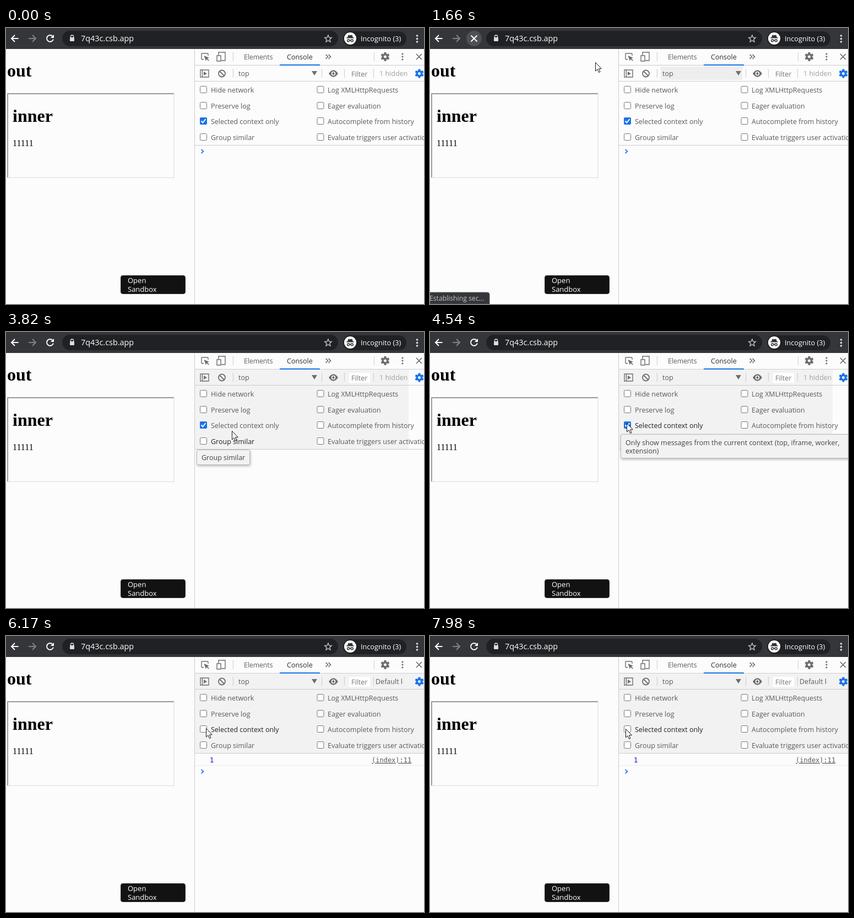
An HTML page that plays this animation: 759 by 500 pixels, repeating every 8 s.

```html
<!DOCTYPE html>
<html lang="en">
<head>
<meta charset="utf-8">
<title>Console context filter</title>
<style>
html, body { margin: 0; width: 100%; height: 100%; overflow: hidden; background: #fcfcfc; }
svg { display: block; }
text { font: 12.5px "Open Sans", "Noto Sans", sans-serif; fill: #5a5a5a; white-space: pre; }
.serif { font: 16px "Liberation Serif", serif; fill: #000; }
.head { font-size: 32px; font-weight: bold; }
.mono { font: 12px "DejaVu Sans Mono", monospace; }
.line { fill: none; stroke-width: 1.4; stroke: #6e6e6e; }
.white { stroke: #fff; stroke-width: 2; }
.light { fill: #fff; }
.rule { fill: none; stroke: #ccc; }
.tip rect { fill: #f2f2f2; stroke: #b8b8b8; filter: drop-shadow(1px 2px 2px #0004); }
</style>
</head>
<body>
<svg id="stage" width="759" height="500" viewBox="0 0 759 500">
  <rect width="759" height="500" fill="#fcfcfc"/>

  <!-- page -->
  <text class="serif head" x="2" y="88">out</text>
  <path d="M2 118H306L304 120H4V270L2 272Z" fill="#999"/>
  <path d="M306 118V272H2L4 270H304V120Z" fill="#eaeaea"/>
  <g id="inner">
    <text class="serif head" x="12" y="170">inner</text>
    <text class="serif" x="12" y="214">11111</text>
  </g>
  <rect x="208.5" y="448.5" width="117" height="33" rx="3.5" fill="#121212" stroke="#333"/>
  <text class="light" x="221" y="462" style="font-size:13px">Open</text>
  <text class="light" x="221" y="478" style="font-size:13px">Sandbox</text>
  <g id="status">
    <path d="M0 479H104Q108 479 108 483V500H0Z" fill="#35363a" stroke="#55565a"/>
    <text x="-1" y="494" style="font-size:12.2px;fill:#c4c6c9">Establishing sec...</text>
  </g>

  <!-- browser bar -->
  <rect width="759" height="38" fill="#35363a"/>
  <path class="line white" d="M22.500 19H10M16 13L10 19L16 25"/>
  <path class="line white" d="M41 19H54M48 13L54 19L48 25" style="stroke:#808286"/>
  <circle id="halo" cx="80" cy="19" r="14" fill="#4e5054"/>
  <g id="reload">
    <path class="line white" d="M84.600 15A6 6 0 1 0 85.800 20.500"/>
    <path class="light" d="M87 12V18H81Z"/>
  </g>
  <path id="stop" class="line white" d="M74.500 13.500L85.500 24.500M85.500 13.500L74.500 24.500"/>
  <rect x="102" y="5" width="501" height="28" rx="14" fill="#202124"/>
  <rect x="116" y="17" width="8" height="7" rx="1" fill="#dadce0"/>
  <path class="line" d="M117.500 17V15.500A2.500 2.500 0 0 1 122.500 15.500V17" style="stroke:#dadce0"/>
  <text class="light" x="136" y="24" style="font-size:14.4px">7q43c.csb.app</text>
  <path class="line" d="M585 13L586.800 17.200L591.300 17.600L587.900 20.600L588.900 25L585 22.700L581.100 25L582.100 20.600L578.700 17.600L583.200 17.200Z" style="stroke:#c4c6c9"/>
  <rect x="612" y="6" width="115" height="27" rx="13.500" fill="#202124"/>
  <circle cx="625" cy="19" r="11" class="light"/>
  <path d="M618 18.500H632V17.300H630L628.500 12.500L625 13.300L621.500 12.500L620 17.300H618Z" fill="#333"/>
  <path class="line" d="M624 22.500Q625 21.500 626 22.500" style="stroke:#333"/>
  <g fill="none" stroke="#333" stroke-width="1.500"><circle cx="621.700" cy="22.700" r="2"/><circle cx="628.300" cy="22.700" r="2"/></g>
  <text class="light" x="644" y="24" style="font-size:12.7px">Incognito (3)</text>
  <g fill="#e8eaed"><circle cx="746.500" cy="14" r="1.700"/><circle cx="746.500" cy="19.500" r="1.700"/><circle cx="746.500" cy="25" r="1.700"/></g>

  <!-- developer tools -->
  <rect id="panel" x="343" y="68" height="144" fill="#f2f2f2"/>
  <rect id="topHover" x="419" y="70" width="148" height="24" fill="#eee"/>
  <path class="rule" d="M342.500 38V500M343 67.500H759M343 96.500H759M343 212.500H759M412.500 44V60M668.500 44V60M412.500 74V90M573.500 74V90M614.500 74V90M667.500 74V90"/>
  <path class="line" d="M359 57H356Q355 57 355 56V47Q355 46 356 46H366Q367 46 367 47V50"/>
  <path d="M359.500 50L369 54L365.500 55.300L368.800 58.600L367.600 59.800L364.300 56.500L362.800 59.500Z" fill="#6e6e6e"/>
  <path class="line" d="M386 49V44H398V59H391M383 50H390V60H383Z"/>
  <text x="432" y="57" style="font-size:12.2px">Elements</text>
  <text x="510" y="57" style="fill:#303030">Console</text>
  <rect x="497" y="66" width="73" height="2" fill="#1a73e8"/>
  <path class="line" d="M580.500 48L584.500 52L580.500 56M585.500 48L589.500 52L585.500 56M745 47L755 57M755 47L745 57" style="stroke-width:1.700"/>
  <g id="gears"></g>
  <g fill="#6e6e6e"><circle cx="720" cy="47" r="1.600"/><circle cx="720" cy="52" r="1.600"/><circle cx="720" cy="57" r="1.600"/></g>
  <path class="line" d="M353 76H368V89H353ZM356.500 76V89"/>
  <path d="M359 79V86L365 82.500ZM555 78H565L560 86Z" fill="#6e6e6e"/>
  <path class="line" d="M386 82.500A6 6 0 1 1 398 82.500A6 6 0 1 1 386 82.500M388 78.500L396 86.500" style="stroke-width:1.800"/>
  <text x="422" y="87">top</text>
  <path d="M586 82.500Q594.500 70 603 82.500Q594.500 95 586 82.500Z" fill="#6e6e6e"/>
  <circle cx="594.500" cy="82.500" r="3" fill="#6e6e6e" stroke="#fff" stroke-width="1.500"/>
  <rect id="filterBox" x="623" y="74" width="38" height="18" fill="#fff"/>
  <text x="627" y="88" style="fill:#757575">Filter</text>
  <text id="hidden" x="678" y="87" style="fill:#a0a0a0">1 hidden</text>
  <svg id="levels" x="671" y="70" width="50" height="25"><text y="17">Default levels</text></svg>
  <g id="options"></g>

  <!-- console output -->
  <g id="message">
    <text class="mono" x="370" y="229" style="fill:#1c00cf">1</text>
    <text class="mono" x="664" y="229" style="text-decoration:underline">(index):11</text>
    <path d="M343 234.500H759" stroke="#ededed"/>
  </g>
  <path id="prompt" class="line" d="M354.500 -3.500L358.500 0L354.500 3.500" style="stroke:#2f7bf0;stroke-width:1.700"/>

  <g id="groupTip" class="tip">
    <rect x="346.500" y="213.500" width="96" height="27" rx="2"/>
    <text x="355" y="232" style="fill:#444">Group similar</text>
  </g>
  <g id="contextTip" class="tip">
    <rect x="346.500" y="185.500" width="430" height="43" rx="2"/>
    <text x="355" y="205" style="fill:#444">Only show messages from the current context (top, iframe, worker,</text>
    <text x="355" y="220" style="fill:#444">extension)</text>
  </g>
  <circle id="ring" cx="365" cy="168" r="10" fill="none" stroke="#111" stroke-width="1.200"/>
  <path id="cursor" d="M.5 .5V16L4 12.700L6.500 18.500L9 17.400L6.500 11.800H11.300Z" fill="#fff" stroke="#111"/>
</svg>
<script>
const $ = id => document.getElementById(id);
const show = (id, on) => $(id).style.display = on ? '' : 'none';

const labels = ['Hide network', 'Preserve log', 'Selected context only', 'Group similar',
  'Log XMLHttpRequests', 'Eager evaluation', 'Autocomplete from history', 'Evaluate triggers user activation'];
$('options').innerHTML = labels.map((label, i) => {
  const x = i < 4 ? 352 : 564.5, y = Math.round(106 + i % 4 * 28.6);
  return `<rect x="${x + .5}" y="${y - .5}" width="12" height="12" rx="2" fill="#fff" stroke="#767676"/>
    <text id="label${i}" x="${i < 4 ? 372 : 584}" y="${y + 11}">${label}</text>`;
}).join('') + `<g id="tick"><rect x="352" y="162" width="13" height="13" rx="2" fill="#1a73e8"/>
  <path d="M354.500 168.500L357.300 171.500L362.500 165" fill="none" stroke="#fff" stroke-width="2"/></g>`;

const gear = (x, y, color) => `<g transform="translate(${x} ${y})" stroke="${color}" fill="none">
  <circle r="4.300" stroke-width="3.600"/>
  ${[0, 60, 120].map(a => `<path d="M0 -8V-5M0 5V8" stroke-width="4" transform="rotate(${a})"/>`).join('')}</g>`;
$('gears').innerHTML = gear(688.5, 52, '#6e6e6e') + gear(750.5, 82.5, '#1a73e8');

// The screen refreshes in even ticks between these times.
const beats = [0, 370, 1390, 1540, 1660, 2500, 2620, 3550, 3700, 3820, 4540, 4790,
  5240, 5780, 5900, 6860, 7010, 7580, 7860, 7980, 8000];
// Pointer path: time, x, y
const path = [[370, 745, 6], [625, 480, 78], [880, 310, 318], [1010, 180, 290], [1390, 80, 14],
  [1540, 80, 14], [1660, 300, 62], [1940, 312, 180], [2500, 309, 270], [2620, 308, 276],
  [3020, 308, 276], [3420, 408, 195], [3700, 410, 195], [3820, 410, 179], [4110, 357, 165],
  [4790, 357, 165], [5090, 252, 205], [5240, 294, 230], [5510, 300, 226], [5780, 350, 195],
  [6040, 363, 167], [6860, 363, 167], [7010, 350, 172], [7152, 332, 170], [7295, 356, 166],
  [7437, 356, 166], [7580, 341, 159], [7850, 341, 159], [7980, 355, 168], [8000, 355, 168]];

function snap(t) {
  const i = beats.findIndex(b => b > t), a = beats[i - 1], b = beats[i];
  const step = (b - a) / Math.max(1, Math.round((b - a) / 135));
  return a + Math.floor((t - a) / step + 1e-6) * step;
}

function pointer(t) {
  const i = Math.max(1, path.findIndex(p => p[0] > t));
  const [t0, x0, y0] = path[i - 1], [t1, x1, y1] = path[i];
  const k = Math.max(0, (t - t0) / (t1 - t0));
  return [Math.round(x0 + (x1 - x0) * k), Math.round(y0 + (y1 - y0) * k)];
}

function draw(now) {
  const t = snap(now % 8000), during = (a, b) => t >= a && t < b;
  const loading = during(1540, 3280);
  const checked = t < 4790 || during(6720, 7430);
  const noneHidden = during(1930, 3280) || !checked;
  const [x, y] = pointer(t);

  show('inner', !during(2070, 3010));
  show('status', loading);
  show('stop', loading);
  show('reload', !loading);
  show('halo', during(1380, 1790));
  show('topHover', during(620, 1790));
  show('panel', t >= 1930);
  $('panel').setAttribute('width', t < 4790 ? 388 : 416);
  show('filterBox', t >= 1930);
  show('hidden', !noneHidden);
  show('levels', noneHidden);
  show('tick', checked);
  show('message', !checked);
  $('prompt').setAttribute('transform', `translate(0 ${checked ? 223.5 : 245.5})`);

  const over = x > 340 && t > 2620;
  $('label2').style.fill = over && x >= 350 && y > 158 && y < 178 ? '#222' : '';
  $('label3').style.fill = over && during(3280, 3960) ? '#222' : '';
  show('groupTip', during(3690, 3960));
  show('contextTip', during(4380, 4790) || during(6440, 7000));
  $('contextTip').style.opacity = during(6850, 7000) ? .82 : 1;
  show('ring', during(6720, 7000));
  show('cursor', t >= 370);
  $('cursor').setAttribute('transform', `translate(${x} ${y})`);
}

function loop() {
  draw(performance.now());
  requestAnimationFrame(loop);
}
loop();
</script>
</body>
</html>
```
